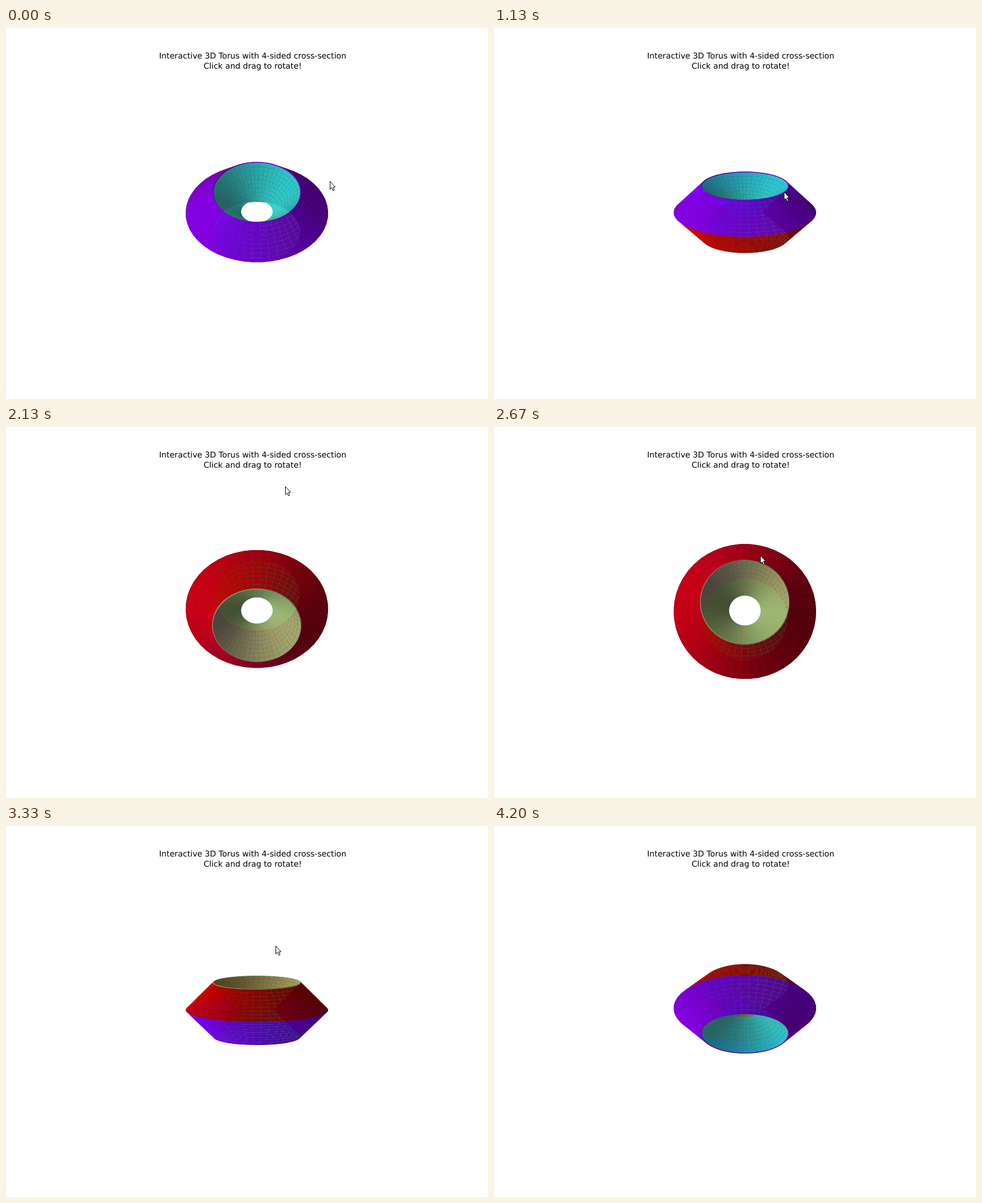
Animation of 853 by 657 pixels, one loop 5270 ms. Source, as an HTML page with a canvas:

```html
<!DOCTYPE html>
<html lang="en">
<head>
<meta charset="utf-8">
<title>Torus with 4-sided cross-section</title>
<style>
html, body { margin: 0; width: 100%; height: 100%; overflow: hidden; background: #fff; }
canvas, svg { position: absolute; left: 0; top: 0; display: block; }
text {
  font: 14.2px "DejaVu Sans", sans-serif; text-anchor: middle; fill: #000;
  text-rendering: geometricPrecision;
}
</style>
</head>
<body>
<canvas id="stage" width="853" height="657"></canvas>
<svg width="853" height="657">
  <text x="436.6" y="54">Interactive 3D Torus with 4-sided cross-section</text>
  <text x="436.6" y="72">Click and drag to rotate!</text>
</svg>
<script>
const ctx = document.getElementById('stage').getContext('2d');
const LOOP = 5270, FPS = 15;
const CX = 444, CY = 325, DIST = 2735;
const RING = 77, TUBE = 49, ALPHA = 0.95;
const COLS = 50, ROWS = 9, LIP = 0.022;
const LIGHT = 165 * Math.PI / 180;
const TILT = 43.6, GAIN = 0.358, LAG = 1;

// Pointer stops; drag marks a move that turns the torus
const stop = (step, x, y, drag = false) => ({ step, x, y, drag });
const path = [
  stop(0, 574, 271), stop(8, 524, 366), stop(9, 524, 366),
  stop(17, 514, 290, true), stop(24, 514, 201, true), stop(31, 497, 88, true),
  stop(32, 495, 105), stop(35, 485, 410),
  stop(40, 472, 227, true), stop(45, 478, 107, true),
  stop(48.8, 480, 311), stop(50, 478, 212, true), stop(51, 476, 190, true),
  stop(57, 331, 621), stop(63, 150, 660)
];

const mix = (a, b, u) => a + (b - a) * u;

// Pointer place and the height dragged so far
function follow(step) {
  let { x, y } = path[0], dragged = 0;
  for (let i = 1; i < path.length; i++) {
    const a = path[i - 1], b = path[i];
    if (step <= a.step) break;
    const u = Math.min(1, (step - a.step) / (b.step - a.step));
    x = mix(a.x, b.x, u);
    y = mix(a.y, b.y, u);
    if (b.drag) dragged += a.y - y;
  }
  return { x, y, dragged };
}

function rainbow(x) {
  return [Math.min(1, Math.abs(2 * x - 0.5)), Math.sin(Math.PI * x), Math.cos(Math.PI * x / 2)];
}

function shade(rgb, light) {
  const k = 255 * (0.65 + 0.35 * light);
  return `rgb(${rgb.map(c => Math.round(c * k)).join()})`;
}

// Point of the diamond profile: side 0..3, u along that side
function profile(side, u) {
  const a = side * Math.PI / 2, b = a + Math.PI / 2;
  return [
    RING + TUBE * mix(Math.cos(a), Math.cos(b), u),
    TUBE * mix(Math.sin(a), Math.sin(b), u)
  ];
}

function buildMesh() {
  const mesh = [];
  const at = ([rad, z], t) => [rad * Math.cos(t), rad * Math.sin(t), z];

  function addBand(side, from, to, hue) {
    const rgb = rainbow(hue / 3);
    const dir = (side + 0.5) * Math.PI / 2;
    const p = profile(side, from), q = profile(side, to);
    for (let col = 0; col < COLS; col++) {
      const a = 2 * Math.PI * col / COLS, b = 2 * Math.PI * (col + 1) / COLS;
      const light = Math.cos(dir) * 0.943 * Math.cos((a + b) / 2 - LIGHT) + Math.sin(dir) / 3;
      mesh.push({ pts: [at(p, a), at(p, b), at(q, b), at(q, a)], fill: shade(rgb, light) });
    }
  }

  for (let side = 0; side < 4; side++) {
    // past each rim a thin lip keeps the colour of the side before it
    const lip = side % 2 ? LIP : 0;
    if (lip) addBand(side, 0, lip, side - 1);
    for (let row = 0; row < ROWS; row++) {
      addBand(side, mix(lip, 1, row / ROWS), mix(lip, 1, (row + 1) / ROWS), side);
    }
  }
  return mesh;
}

const mesh = buildMesh();

function trace(pts) {
  ctx.beginPath();
  pts.forEach(([x, y]) => ctx.lineTo(x, y));
  ctx.closePath();
}

function drawTorus(degrees) {
  const e = degrees * Math.PI / 180, c = Math.cos(e), s = Math.sin(e);
  const quads = mesh.map(({ pts, fill }) => {
    let depth = 0;
    const flat = pts.map(([x, f, z]) => {
      const d = f * c + z * s, k = DIST / (DIST - d);
      depth += d;
      return [CX + x * k, CY + (f * s - z * c) * k];
    });
    return { flat, fill, depth };
  });
  quads.sort((a, b) => a.depth - b.depth);
  ctx.globalAlpha = ALPHA;
  for (const { flat, fill } of quads) {
    trace(flat);
    ctx.fillStyle = fill;
    ctx.fill();
  }
  ctx.globalAlpha = 1;
}

const arrow = [[0, 0], [0, 14], [3, 11.3], [5.4, 16.4], [7.6, 15.4], [5.3, 10.3], [9.3, 10.3]];

function drawPointer({ x, y }) {
  const px = Math.round(x) - 0.5, py = Math.round(y) + 0.5;
  trace(arrow.map(([ax, ay]) => [px + ax, py + ay]));
  ctx.fillStyle = '#fff';
  ctx.fill();
  ctx.strokeStyle = '#000';
  ctx.lineWidth = 1;
  ctx.lineJoin = 'round';
  ctx.stroke();
}

function draw(step) {
  ctx.fillStyle = '#fff';
  ctx.fillRect(0, 0, 853, 657);
  drawTorus(TILT - GAIN * follow(step - LAG).dragged);
  drawPointer(follow(step));
}

const start = performance.now();
let shown = -1;

function tick() {
  const t = (performance.now() - start) % LOOP;
  const step = Math.floor((t + 3.4) * FPS / 1000);
  if (step !== shown) draw(shown = step);
  requestAnimationFrame(tick);
}
tick();
</script>
</body>
</html>
```
